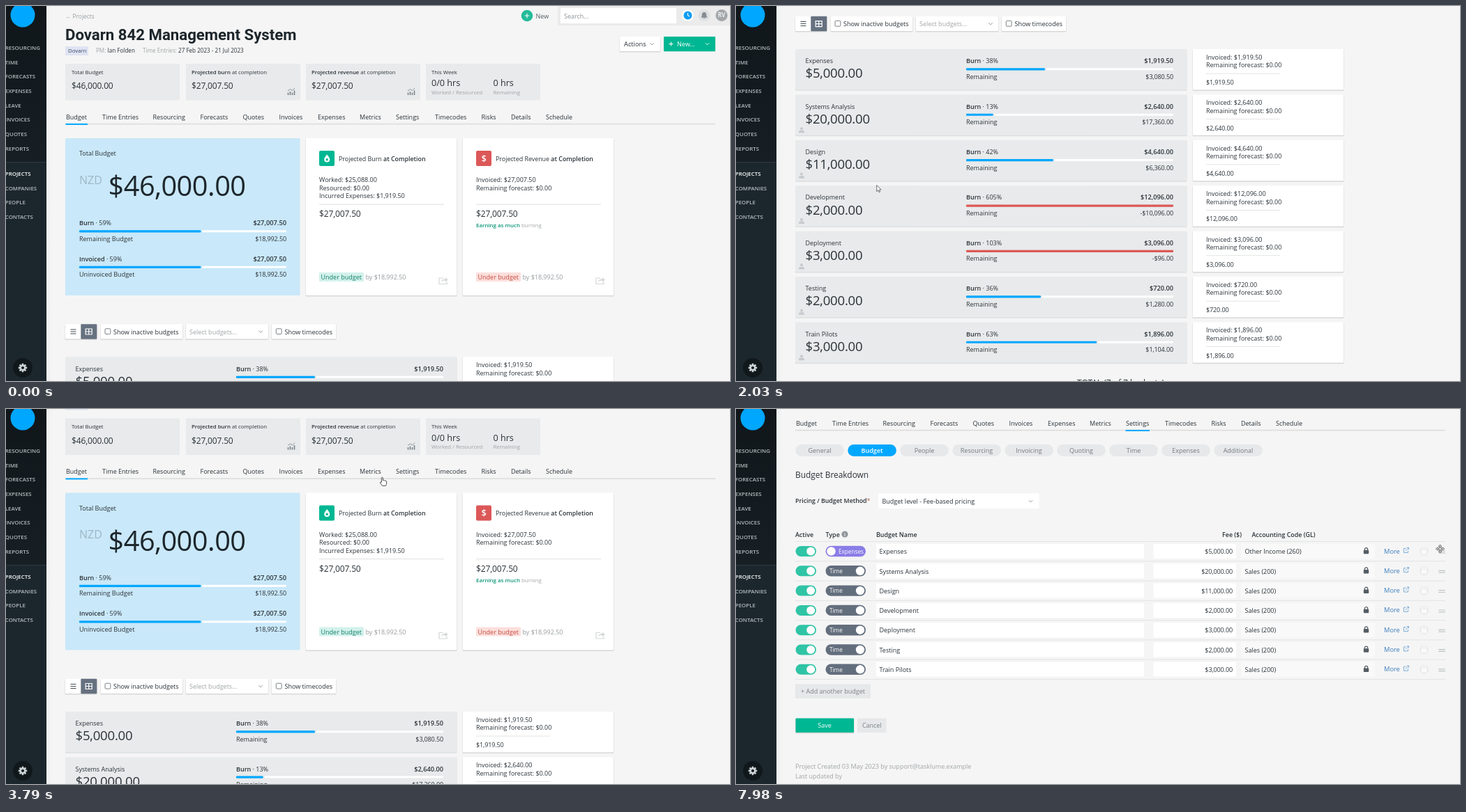
Animation of 1038 by 539 pixels, one loop 8000 ms. Source, as an HTML page:

```html
<!DOCTYPE html>
<html lang="en">
<head>
<meta charset="utf-8">
<title>Project budget</title>
<style>
html, body { margin: 0; width: 100%; height: 100%; overflow: hidden; background: #f5f5f5; }
svg { display: block; width: 1038px; height: 539px; font-family: "Open Sans", "Noto Sans", sans-serif; }
text { white-space: pre; }
.b { font-weight: 600; }
.num { letter-spacing: -.012em; }
.title { font-family: Roboto, Inter, sans-serif; font-weight: 700; }
</style>
</head>
<body>
<svg id="stage" viewBox="0 0 1038 539" xmlns="http://www.w3.org/2000/svg"></svg>
<script>
const INK = '#2b3238', GRAY = '#a0a4a7', BLUE = '#00a7ff', GREEN = '#00b793', RED = '#dc5858',
  PANEL = '#e8eaeb', SKY = '#c9e8f9', RULE = '#e1e2e2';
const COMPANY = 'Dovarn', PROJECT = 'Dovarn 842 Management System', MANAGER = 'Ian Folden';

// y is the middle of the capitals
function txt(x, y, s, o = {}) {
  const size = o.size || 9;
  const cls = [o.cls || '', /^-?\$/.test(s) && o.cls !== 'b' ? 'num' : ''].join(' ').trim();
  return `<text x="${x}" y="${(y + size * .357).toFixed(2)}" font-size="${size}" fill="${o.fill || INK}"` +
    `${cls ? ` class="${cls}"` : ''}${o.end ? ` text-anchor="${o.end}"` : ''}>${s}</text>`;
}
const rect = (x, y, w, h, fill, r = 0, more = '') =>
  `<rect x="${x}" y="${y}" width="${w}" height="${h}" fill="${fill}" rx="${r}" ${more}/>`;
const circle = (x, y, r, fill, more = '') => `<circle cx="${x}" cy="${y}" r="${r}" fill="${fill}" ${more}/>`;
const path = (x, y, d, stroke, w = 1, fill = 'none', more = '') =>
  `<path transform="translate(${x} ${y})" d="${d}" stroke="${stroke}" stroke-width="${w}" fill="${fill}" ${more}/>`;
const group = (id, s) => `<g id="${id}">${s}</g>`;
const bold = s => `<tspan class="b">${s}</tspan>`;
const tint = (s, fill) => `<tspan fill="${fill}">${s}</tspan>`;
const card = (x, y, w, h, fill = '#fff') =>
  rect(x - .5, y + .5, w + 1, h + 1, '#000', 1.5, 'opacity=".12"') + rect(x, y, w, h, fill, 1);
const chevron = (x, y, c = '#858c91') => path(x, y, 'M-2.7-1.3L0 1.4L2.7-1.3', c, .9);
const lock = (x, y, c = '#555d64') =>
  rect(x - 3.7, y - 1, 7.4, 5.5, c, 1) + path(x, y, 'M-2.2 0V-2a2.2 2.2 0 0 1 4.4 0V0', c, 1.2);

function bar(x, y, w, part, color = BLUE) {
  const done = Math.min(1, part) * w;
  const rest = done < w ? rect(x + done + 2, y - 1.3, w - done - 2, 3, '#fff', 1) : '';
  return rest + rect(x, y - 1.3, done, 3.2, color, 1);
}

function sidebar() {
  const names = ['RESOURCING', 'TIME', 'FORECASTS', 'EXPENSES', 'LEAVE', 'INVOICES', 'QUOTES', 'REPORTS',
    'PROJECTS', 'COMPANIES', 'PEOPLE', 'CONTACTS'];
  let s = rect(58, 0, 9, 539, 'url(#edge)') + rect(0, 0, 58, 539, '#1c272d') + rect(0, 0, 58, 224, 'url(#dark)') +
    rect(0, 224, 58, .8, '#333e44') + circle(24, 13, 17.5, BLUE);
  names.forEach((n, i) => {
    const y = 60 + i * 20.7 + (i > 7 ? 15.4 : 0);
    s += txt(-1.2, y, n, { size: 7.9, cls: 'b', fill: n === 'PROJECTS' ? '#fff' : '#b4bbbf' });
  });
  s += circle(24, 520, 14, '#11181c');
  for (let a = 0; a < 360; a += 45) s += rect(22.7, 513.8, 2.6, 4, '#cdd2d5', 0, `transform="rotate(${a} 24 520)"`);
  return s + circle(24, 520, 3.3, 'none', 'stroke="#cdd2d5" stroke-width="2.5"');
}

const TABS = [['Budget', 86], ['Time Entries', 138], ['Resourcing', 210.5], ['Forecasts', 278.5], ['Quotes', 339.5],
  ['Invoices', 391.5], ['Expenses', 447], ['Metrics', 507], ['Settings', 559], ['Timecodes', 615],
  ['Risks', 681.5], ['Details', 724], ['Schedule', 774]];
const underline = (x, w) => rect(x, 168.9, w, 2, BLUE);

function header() {
  let s = txt(85, 14.5, '← Projects', { size: 8.4, fill: '#989ea2' }) +
    txt(85, 41, PROJECT, { size: 22.2, cls: 'title', fill: '#1d262b' }) +
    rect(85, 58, 33, 13, '#dfe3f2', 1) + txt(89, 64.5, COMPANY, { size: 7.8, fill: '#3b4768' }) +
    txt(129, 64.5, tint('PM: ', GRAY) + MANAGER, { size: 8.1 }) +
    txt(196, 64.5, tint('Time Entries: ', GRAY) + '27 Feb 2023 - 21 Jul 2023', { size: 8.1 });

  s += circle(747, 14, 8.3, '#24bb99') + path(747, 14, 'M-3.3 0H3.3M0-3.3V3.3', '#fff', 1.1) +
    txt(759.5, 14.3, 'New', { size: 9, fill: '#545c62' }) +
    rect(791, 0, 247, 28, '#ebebeb') + rect(795, 3, 166, 22, '#fff', 1) + txt(800, 14.5, 'Search...', { fill: '#8a9094' }) +
    circle(977.5, 13.5, 8.3, '#fff') + circle(977.5, 13.5, 6, '#0c9df2') + path(977.5, 13.5, 'M0-3.5V0L2.3 1.5', '#fff', 1.1) +
    circle(1001, 13.5, 8.3, '#dedfe0') +
    path(1001, 13, 'M-4 3.2Q-2.7 2-2.7-1A2.7 2.7 0 0 1 2.7-1Q2.7 2 4 3.2ZM-1.2 4.5H1.2', '#858b90', .8, '#858b90') +
    circle(1026, 13.5, 8.5, '#a3a7aa') + txt(1026, 13.5, 'RV', { size: 8.2, cls: 'b', fill: '#fff', end: 'middle' });

  s += card(880, 44, 58, 21) + txt(886, 55, 'Actions', { size: 9.3 }) + chevron(926, 54.5) +
    rect(943, 44, 74, 21.3, GREEN, 1) + path(953.5, 54.5, 'M-3 0H3M0-3V3', '#fff', 1) +
    txt(962, 55, 'New...', { fill: '#fff' }) + chevron(1005.5, 54.5, '#fff');

  const chart = x => path(x, 123, 'M-4.5 5V1.5M-1.5 5V0M1.5 5V1.5M4.5 5V-1.5', '#7d858a', 1.6) +
    path(x, 123, 'M-5-1L-1.5-3.5L1.5-1.5L5-5', '#7d858a', .9);
  for (const x of [85, 258, 430, 602]) s += rect(x, 83, 164, 52.5, PANEL, 1);
  const small = { size: 7.8 }, hours = { size: 12.6 };
  s += txt(94, 95, 'Total Budget', small) + txt(94, 115, '$46,000.00', { size: 12 }) +
    txt(266, 95, bold('Projected burn') + ' at completion', small) + txt(266, 115, '$27,007.50', { size: 12 }) + chart(409) +
    txt(438, 95, bold('Projected revenue') + ' at completion', small) + txt(438, 115, '$27,007.50', { size: 12 }) + chart(581) +
    txt(610, 95, 'This Week', small) + txt(610, 110.5, '0/0 hrs', hours) + txt(698.5, 110.5, '0 hrs', hours) +
    txt(610, 124, 'Worked / Resourced', { size: 7.8, fill: GRAY }) + txt(698.5, 124, 'Remaining', { size: 7.8, fill: GRAY });

  s += rect(85, 168.8, 932, 1.6, '#dcdddd');
  for (const [n, x] of TABS) s += txt(x, 159.5, n);
  return s;
}

function bigCard(x, color, icon, title, lines, badge, badgeInk) {
  let s = card(x, 190, 216, 226) + rect(x + 19, 208, 22, 22, color, 2) + icon +
    txt(x + 47, 219.5, `Projected ${title} ${bold('at Completion')}`, { size: 8.9 }) +
    rect(x + 19, 284.7, 179, .9, '#dcdddd') + txt(x + 19, 299, '$27,007.50', { size: 12 }) +
    rect(x + 19, 383, 64, 13, badge, 1) + txt(x + 21.5, 390, 'Under budget', { fill: badgeInk }) +
    txt(x + 85.5, 390, 'by $18,992.50', { fill: '#969b9f' }) +
    path(x + 197, 394.5, 'M0-3.5H-6V5H5V2', '#d3d6d7', 1.2) +
    path(x + 197, 394.5, 'M-3 2Q-2.5-2 3-2V-4.5L6.5-1L3 2.5V0Q-1-.5-3 2Z', 'none', 0, '#d3d6d7');
  lines.forEach((l, i) => s += txt(x + 19, 250 + i * 11.4, l));
  return s;
}

function budgetRow(y, name, total, pct, used, left, o = {}) {
  const fill = o.fill || PANEL;
  let s = rect(85, y + 1, 561.5, 58.8, fill === PANEL ? '#dcdedf' : '#bcdcee', 1) + rect(85, y, 561.5, 58.4, fill, 1) +
    card(655, y, 216, 58.4) + txt(99.5, y + 17, name) + txt(99.5, y + 34.7, total, { size: 18.6 }) +
    txt(330, y + 17, `${bold('Burn')} · ${Math.round(pct)}%`) + txt(627, y + 17, used, { size: 9.2, cls: 'b', end: 'end' }) +
    bar(330, y + 28.5, 297, pct / 100, pct > 100 ? RED : BLUE) +
    txt(330, y + 39.5, 'Remaining') + txt(627, y + 39.5, left, { end: 'end' }) +
    txt(674, y + 11.7, 'Invoiced: ' + used) + txt(674, y + 23.2, 'Remaining forecast: $0.00') +
    rect(674, y + 34.7, 106, .8, '#dcdddd') + txt(674, y + 48, used);
  if (o.person) s += circle(94, y + 48.7, 2, '#c6cacc') + path(94, y + 51.3, 'M-4 3.5V2Q-4 0-1.5 0H1.5Q4 0 4 2V3.5Z', 'none', 0, '#c6cacc');
  return s;
}

const BUDGETS = [
  ['Expenses', '$5,000.00', 38, '$1,919.50', '$3,080.50'],
  ['Systems Analysis', '$20,000.00', 13, '$2,640.00', '$17,360.00'],
  ['Design', '$11,000.00', 42, '$4,640.00', '$6,360.00'],
  ['Development', '$2,000.00', 605, '$12,096.00', '-$10,096.00'],
  ['Deployment', '$3,000.00', 103, '$3,096.00', '-$96.00'],
  ['Testing', '$2,000.00', 36, '$720.00', '$1,280.00'],
  ['Train Pilots', '$3,000.00', 63, '$1,896.00', '$1,104.00']];

function budgetPage() {
  let s = underline(85.5, 31.5) + rect(85, 190, 336.5, 226, SKY, 1) + txt(105, 212, 'Total Budget') +
    txt(105, 250, 'NZD', { size: 16, fill: '#9db7c5' }) +
    txt(146.5, 259, '$46,000.00', { size: 39.7, fill: '#1d262b' });
  [['Burn', 'Remaining'], ['Invoiced', 'Uninvoiced']].forEach(([a, b], i) => {
    const y = 312 + i * 51.6;
    s += txt(105, y, `${bold(a)} · 59%`) + txt(402, y, '$27,007.50', { size: 9.3, cls: 'b', end: 'end' }) +
      bar(105, y + 11.5, 297, .587) + txt(105, y + 22.5, b + ' Budget') + txt(402, y + 22.5, '$18,992.50', { end: 'end' });
  });
  const drop = path(460.2, 219, 'M0-5.5Q4-.8 4 1.5A4 4 0 0 1-4 1.5Q-4-.8 0-5.5Z', 'none', 0, '#fff') + circle(460.2, 220.8, 1.7, GREEN);
  s += bigCard(430, GREEN, drop, 'Burn', ['Worked: $25,088.00', 'Resourced: $0.00', 'Incurred Expenses: $1,919.50'], '#d3f1eb', '#12806d');
  s += bigCard(655, RED, txt(685.2, 219.3, '$', { size: 13, cls: 'b', fill: '#fff', end: 'middle' }), 'Revenue',
    ['Invoiced: $27,007.50', 'Remaining forecast: $0.00'], '#fbdfdc', '#c84b3f');
  s += txt(674, 315.5, tint(bold('Earning as much'), '#0c9679') + ' burning', { size: 7.9, fill: GRAY });

  const box = x => rect(x, 463.8, 7.8, 7.8, '#fff', 1.2, 'stroke="#6d7378" stroke-width=".9"');
  s += card(85, 457.5, 45, 21) + rect(107.3, 457.3, 23, 21.5, '#667180', 1) +
    path(96.5, 468, 'M-4-3H4M-4 0H4M-4 3H4', '#444c52', 1.1) +
    path(118.7, 468, 'M-4.5-4H4.5V4H-4.5ZM0-4V4M-4.5 0H4.5', '#fff', 1.2) +
    card(136, 457.5, 117, 21) + box(142) + txt(154, 468.5, 'Show inactive budgets') +
    card(258, 457.5, 118, 21) + txt(263, 468.5, 'Select budgets...', { fill: GRAY }) + chevron(365, 468) +
    card(381, 457.5, 92, 21) + box(387.3) + txt(399.5, 468.5, 'Show timecodes');

  BUDGETS.forEach((b, i) => s += budgetRow(504.5 + 65.4 * i, ...b, { person: i > 0 }));
  s += path(0, 984, 'M85 0H483M620 0H1017', '#bfc2c4', 1.1, 'none', 'stroke-dasharray="4 2"') +
    txt(551.5, 984, 'TOTAL (7 of 7 budgets)', { size: 12, end: 'middle' });
  return s + budgetRow(1017.5, 'Total Budget', '$46,000.00', 58.7, '$27,007.50', '$18,992.50', { fill: SKY });
}

function pills(active) {
  const names = ['General', 'Budget', 'People', 'Resourcing', 'Invoicing', 'Quoting', 'Time', 'Expenses', 'Additional'];
  return underline(558.5, 34.5) + names.map((n, i) => rect(85.3 + i * 75, 190, 69.6, 17, i === active ? BLUE : '#e6e8e9', 8.5) +
    txt(120 + i * 75, 198.8, n, { fill: i === active ? '#fff' : '#737a80', end: 'middle', cls: i === active && active ? 'b' : '' })).join('');
}

function generalPage() {
  const fields = [['Project Name', PROJECT], ['Project Number', ''], ['Company', COMPANY], ['Project Manager', MANAGER],
    ['Account Manager', 'Ian Morvey'], ['Organisation', 'RV'], ['Project Type'], ['Contractual Status']];
  let s = pills(0) + txt(85, 233.5, 'General Settings', { size: 11.9 });
  fields.forEach(([label, value], i) => {
    const y = 271.3 + 35.25 * i;
    s += txt(85, y, label + (i === 1 ? '' : tint('*', '#c07a70')), { fill: '#757b80' }) + rect(85, y + 17.2, 514, .9, RULE);
    if (value === undefined) return;
    s += i ? rect(224, y - 10.7, 375, 21.5, '#fff', 1)
      : rect(223, y - 11.7, 377, 23, '#bfe9fb', 2) + rect(224.3, y - 10.4, 374.4, 20.4, '#fff', 1, 'stroke="#34b6ee" stroke-width="1"');
    s += txt(230, y + .3, value) + (i > 1 ? chevron(587.5, y) : '');
  });
  s += group('caret', rect(229, 265.5, .9, 11, '#222'));
  s += path(229, 483, 'M-4 .2L-1.4 2.8L4-2.8', INK, 1.6) + txt(236, 483, 'Billable') +
    path(287, 483, 'M-2.6-2.6L2.6 2.6M-2.6 2.6L2.6-2.6', GRAY, 1.2) + txt(295, 483, 'Non-billable', { fill: GRAY }) + lock(587.5, 482.5);
  [[228.5, 'Signed'], [285.7, 'Unsigned (committed)'], [406.3, 'Unsigned (opportunity)']].forEach(([x, n], i) => {
    s += circle(x, 517.8, 3.8, '#fff', `stroke="${i ? '#70767a' : '#1687e8'}" stroke-width=".9"`) +
      (i ? '' : circle(x, 517.8, 2.2, '#1687e8')) + txt(x + 7.6, 518.2, n);
  });
  return s;
}

function tablePage() {
  const head = { cls: 'b', size: 8.9 };
  let s = pills(1) + txt(85, 233.5, 'Budget Breakdown', { size: 11.9 }) +
    txt(85, 270.5, 'Pricing / Budget Method' + tint('*', '#c07a70'), { cls: 'b', size: 8.8 }) +
    rect(204, 260.5, 230.5, 21.5, '#fff', 1) + txt(209.5, 271.8, 'Budget level - Fee-based pricing') + chevron(422.5, 271.5) +
    txt(85, 319.5, 'Active', head) + txt(128.5, 319.5, 'Type', head) + circle(156, 319, 4.6, '#90969b') +
    txt(156, 319, 'i', { size: 7, cls: 'b', fill: '#fff', end: 'middle' }) + txt(201, 319.5, 'Budget Name', head) +
    txt(725, 319.5, 'Fee ($)', { ...head, end: 'end' }) + txt(739.5, 319.5, 'Accounting Code (GL)', head) + rect(85, 329, 932, .9, RULE);
  BUDGETS.forEach(([name, fee], i) => {
    const y = 343.5 + 28.3 * i;
    s += rect(85.5, y - 7.5, 29.5, 15, '#2fc4a5', 7.5) + circle(107.2, y, 6, '#fff') +
      rect(128.5, y - 7.7, 57.5, 15.4, i ? '#636e7d' : '#8a7de6', 7.7) + circle(i ? 178 : 136.5, y, 6.2, '#fff') +
      txt(i ? 134 : 147, y + .3, i ? 'Time' : 'Expenses', { size: 8.2, fill: '#fff' }) +
      rect(201, y - 10.5, 384, 21, '#fff', 1) + txt(205.5, y + .5, name) +
      rect(598.5, y - 10.5, 118.5, 21, '#fff', 1) + txt(712, y + .5, fee, { end: 'end' }) +
      rect(724, y - 10.5, 192, 21, '#f9f9f9', 1) + txt(729.5, y + .5, i ? 'Sales (200)' : 'Other Income (260)') + lock(903.5, y - .7) +
      txt(929, y - .3, 'More', { size: 9.3, fill: '#3b7dbd' }) +
      path(961, y - 1.5, 'M-.5-2.6H-3.6V3.4H2.5V.5M-1.2 1L3.3-3.5M.8-3.7H3.5V-1', '#72a5d6', .9) +
      circle(986.5, y, 6.6, '#ececec') + lock(986.5, y - .5, '#fafafa') +
      path(1012, y + 1, 'M-4.8-1.4H4.8M-4.8 1.4H4.8', '#bfc3c5', 1.2) + rect(85, y + 13.8, 932, .9, RULE);
  });
  return s + rect(85, 534.5, 108, 20.5, '#e6e8e9', 1) + txt(93, 545, '+ Add another budget', { fill: '#7b8186' }) +
    card(85.5, 583.5, 83.5, 20.5, GREEN) + txt(127, 593.7, 'Save', { fill: '#fff', end: 'middle' }) +
    rect(174, 583.5, 41.5, 20.5, '#e6e8e9', 1) + txt(194.8, 593.7, 'Cancel', { fill: '#7b8186', end: 'middle' }) +
    txt(85, 652.7, 'Project Created 03 May 2023 by support@tasklume.example', { fill: GRAY }) +
    txt(85, 666.5, 'Last updated by', { fill: GRAY });
}

const POINTERS = {
  arrow: path(0, 0, 'M0 0V9L2.1 7.2L3.5 10.2L4.9 9.6L3.6 6.7L6.4 6.4Z', '#333', .7, '#fff'),
  hand: path(0, 0, 'M-1 7.5V1Q0-.4 1 1V4.8Q2 4 3 5.2Q4 4.4 4.7 5.6Q6 5 6.2 6.6V9.5Q6 11 5 12.6H.2Q-1 10.8-3 8Q-2.6 6.3-1 7.5Z', '#222', .8, '#fff'),
  beam: path(0, 0, 'M-2.2-4.2H-.6L0-3.6L.6-4.2H2.2M0-3.6V3.6M-2.2 4.2H-.6L0 3.6L.6 4.2H2.2', '#333', .8),
  move: path(0, 0, 'M0-6L2-3.6H.9V-.9H3.6V-2L6 0L3.6 2V.9H.9V3.6H2L0 6L-2 3.6H-.9V.9H-3.6V2L-6 0L-3.6-2V-.9H-.9V-3.6H-2Z', '#333', .8, '#fff')
};

const stage = document.getElementById('stage');
stage.innerHTML = `<defs>
  <linearGradient id="dark" x2="0" y2="1"><stop stop-color="#10161a"/><stop offset="1" stop-color="#171f24"/></linearGradient>
  <linearGradient id="edge"><stop stop-color="#eeefef"/><stop offset="1" stop-color="#f5f5f5"/></linearGradient></defs>` +
  rect(0, 0, 1038, 539, '#f5f5f5') +
  group('page', header() + group('budget', budgetPage()) + group('general', generalPage()) + group('table', tablePage())) +
  sidebar() + group('status', rect(-3, 535.7, 250, 8, '#d3e2f6', 2)) +
  group('pointer', Object.entries(POINTERS).map(([k, d]) => group(k, d)).join(''));

const LOOP = 8000, OPEN = 5490, SWITCH = 6340;
// [time, value...] with straight motion between entries
const SCROLL = [[0, 0], [270, 0], [1680, 354.5], [2480, 555], [2730, 555], [2900, 480], [3350, 130], [3520, 69.5],
  [OPEN - .1, 69.5], [OPEN, 0], [6680, 0], [7090, 99], [7350, 139], [LOOP, 139]];
const POINTER = [[0, 197, 237], [1680, 197, 237], [2500, 208, 285], [3560, 208, 285], [3790, 539, 98], [3930, 588, 68],
  [4060, 588, 69], [4480, 580, 87], [4619, 580, 87], [4620, 581, 88], [5550, 581, 88], [6150, 195, 199], [6680, 195, 199],
  [7090, 495, 228], [7520, 510, 226], [7740, 790, 170], [7900, 980, 188], [7960, 1009.5, 201], [LOOP, 1009.5, 201]];
const SHAPES = [[0, 'arrow'], [3700, 'hand'], [4620, 'arrow'], [6120, 'hand'], [6760, 'beam'], [7600, 'arrow'], [7940, 'move']];

function along(keys, t) {
  const i = Math.max(1, keys.findIndex(k => k[0] > t));
  const a = keys[i - 1], b = keys[i], p = (t - a[0]) / (b[0] - a[0]);
  return a.slice(1).map((v, n) => v + (b[n + 1] - v) * p);
}

const el = id => document.getElementById(id);
const show = (id, on) => el(id).style.display = on ? '' : 'none';

function draw(t) {
  const [scroll] = along(SCROLL, t), [x, y] = along(POINTER, t);
  el('page').setAttribute('transform', `translate(0 ${-scroll.toFixed(2)})`);
  el('pointer').setAttribute('transform', `translate(${x.toFixed(2)} ${y.toFixed(2)})`);
  show('budget', t < OPEN);
  show('general', t >= OPEN && t < SWITCH);
  show('table', t >= SWITCH);
  show('caret', (t - OPEN) % 1000 < 500);
  show('status', t >= 4070 && t < 5560);
  show('pointer', t >= 600);
  const shape = SHAPES.filter(s => s[0] <= t).pop()[1];
  for (const k in POINTERS) show(k, k === shape);
}

const start = performance.now();
function tick() {
  draw((performance.now() - start) % LOOP);
  requestAnimationFrame(tick);
}
tick();
</script>
</body>
</html>
```
